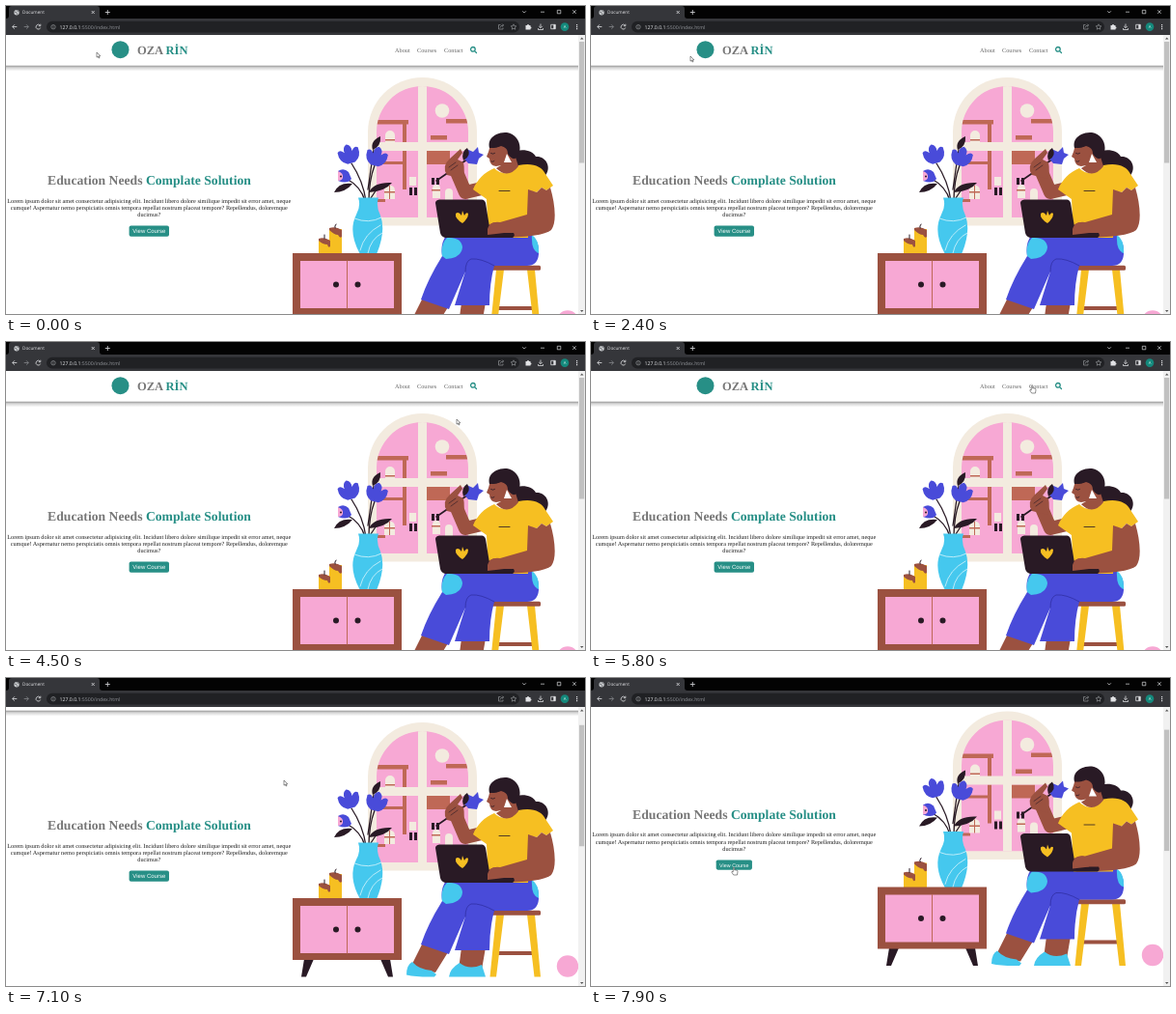
Animation of 600x319 px, one loop 8000 ms. Source, as an HTML page:

```html
<!DOCTYPE html>
<html lang="en">
<head>
<meta charset="utf-8">
<title>Document</title>
<style>
  html, body { margin: 0; width: 100%; height: 100%; overflow: hidden; background: #fff; }
  svg { display: block; width: 100%; height: 100%; }
  text { text-rendering: geometricPrecision; }
  .serif { font-family: "Liberation Serif", serif; font-size: 6.25px; }
  .ui { font-family: "Open Sans", sans-serif; font-size: 4.7px; }
  .mid { text-anchor: middle; }
  .bold { font-weight: bold; }
  .teal { fill: #278f86; }
  .grey { fill: #777; }
  .pink { fill: #f7a8d4; }
  .cream { fill: #f3ebdf; }
  .brick { fill: #bf6856; }
  .brown { fill: #9b5140; }
  .dark { fill: #291a25; }
  .blue { fill: #494bd9; }
  .cyan { fill: #45c8ee; }
  .gold { fill: #f6bf22; }
  .line { fill: none; stroke-linecap: round; stroke-linejoin: round; }
  .icon { fill: none; stroke: #dcdde0; stroke-width: .8; }
  .dim { stroke: #a3a6aa; stroke-width: .6; }
</style>
</head>
<body>
<svg viewBox="0 0 600 319">
  <defs>
    <linearGradient id="shade" x2="0" y2="1">
      <stop stop-color="#000" stop-opacity=".45"/>
      <stop offset=".4" stop-color="#000" stop-opacity=".16"/>
      <stop offset="1" stop-color="#000" stop-opacity="0"/>
    </linearGradient>
    <clipPath id="view"><path d="M0 30H593V319H0Z"/></clipPath>
    <clipPath id="pane"><path d="M384 219V130.5a47.5 47.5 0 0 1 95 0V219Z"/></clipPath>
    <path id="tulip" class="blue" d="M-11-5Q-8-8-4-3Q-5-9 0-11Q5-9 4-3Q8-8 11-5Q12 5 4 9H-4Q-12 5-11-5Z"/>
  </defs>

  <rect width="600" height="319" fill="#fff"/>
  <g clip-path="url(#view)">
    <g id="page">
      <!-- hero text -->
      <text class="serif bold mid grey" x="148.5" y="185.300" style="font-size:13.68px">Education Needs <tspan class="teal">Complate Solution</tspan></text>
      <g class="serif mid" fill="#1c1c1c">
        <text x="148.25" y="203.800">Lorem ipsum dolor sit amet consectetur adipisicing elit. Incidunt libero dolore similique impedit sit error amet, neque</text>
        <text x="148.25" y="211">cumque! Aspernatur nemo perspiciatis omnis tempora repellat nostrum placeat tempore? Repellendus, doloremque</text>
        <text x="148.25" y="218.200">ducimus?</text>
      </g>
      <g id="button">
        <rect class="teal" x="-20.7" y="-5.7" width="41.4" height="11.200" rx="2"/>
        <text class="mid" y="2.1" fill="#fff" font-family="Liberation Sans, sans-serif" font-size="6">View Course</text>
      </g>

      <!-- window -->
      <path class="cream" d="M375 227.500V130.500a56.500 56.500 0 0 1 113 0V227.500Z"/>
      <g clip-path="url(#pane)">
        <rect class="pink" x="384" y="80" width="95" height="140"/>
        <circle class="cream" cx="452" cy="108.500" r="7.300"/>
        <path class="brick" d="M382 118h35v4.500h-35zM411 122h4v20h-4zM456 117h24v4.500h-24zM440 134h17v4.500h-17zM384 161h31v3h-31zM411 150h4v40h-4zM436 150h24v14h-24zM384 200h9v3h-9z"/>
        <path class="cream" d="M393 142v-8a5 5 0 0 1 10 0v8zM392 200v-9a5.500 5.500 0 0 1 11 0v9zM442 199v-10a4 4 0 0 1 8 0v10zM455 202v-9a4 4 0 0 1 8 0v9zM418 177h7v9h-7z"/>
        <path class="brick" d="M393 138h10v1.500h-10zM392 192h11v1.500h-11zM397 186h1v14h-1zM441 190h9v1.500h-9z"/>
        <path class="dark" d="M418 188h3v8h-3zM423 188h3v8h-3zM441 178h3v7h-3zM446 178h3v7h-3z"/>
        <path class="cream" d="M427 80h9v140h-9zM384 141h95v9h-95z"/>
      </g>

      <!-- flowers and vase -->
      <g class="line" stroke="#291a25" stroke-width="1.300">
        <path d="M358 163Q370 181 373 202M382 165Q376 181 376 202M353 179Q368 187 372 202M381 149Q378 170 375 190M386 187L378 199"/>
      </g>
      <path class="dark" d="M380 149Q377 140 388 135Q389 145 380 149ZM340 193Q345 182 359 184Q352 193 340 193ZM376 193Q381 182 400 183Q393 192 376 193Z"/>
      <use href="#tulip" transform="translate(355.500 154) rotate(-16)"/>
      <use href="#tulip" transform="translate(384 156.500) rotate(14)"/>
      <path class="blue" d="M344 171Q350 167 355 172L358 179Q354 185 344 181Z"/>
      <path class="pink" d="M344 171Q350 173 349 178Q348 181 344 181Z"/>
      <circle class="dark" cx="347" cy="176.500" r="1"/>
      <path class="cyan" d="M365 198.500H386Q383 207 388 217Q394 233 384 257H367Q354 234 363 216Q368 207 365 198.500Z"/>
      <path class="line" stroke="#d8f4fc" stroke-width=".8" d="M361 220Q376 226 389 219M388 227Q371 236 367 253M390 235Q378 241 375 256"/>

      <!-- candles and dresser -->
      <path class="gold" d="M335 231h13v26h-13zM324 242h12v15h-12z"/>
      <path class="brown" d="M335 230q7-2 13 2v7q-2 2-4-2q-4 0-9-5zM324 241q6-2 12 2v6q-2 2-3-2q-5 0-9-4z"/>
      <path class="line" stroke="#291a25" d="M341 230q-1-2 1-4M330 241v-4"/>
      <path class="dark" d="M309 319h10l-8 18.500h-5zM388 319h10l3 18.500h-5z"/>
      <path class="brown" d="M297 256h113v64h-113z"/>
      <path class="pink" d="M305 264h97v49h-97z"/>
      <path class="line" stroke="#bf6856" d="M353.500 264v49"/>
      <circle class="dark" cx="342" cy="288.500" r="3"/>
      <circle class="dark" cx="364.500" cy="288.500" r="3"/>

      <!-- stool -->
      <path class="brown" d="M509 311h38v4h-38z"/>
      <path class="gold" d="M508 273h8l-8 64.500h-6.500zM540 273h8l6 64.500h-6.500z"/>
      <rect class="brown" x="502" y="268.800" width="52" height="5" rx="1.500"/>

      <!-- legs and shoes -->
      <path class="brown" d="M432 302L458 312L445 333L419 328ZM472 307H497L493 330H469Z"/>
      <path class="cyan" d="M421 322Q428 330 441 331L446 335L444 337.500Q426 338 415 335.500Q415 325 421 322ZM470 323Q480 331 493 325L497 337.500H459Q460 329 470 323Z"/>
      <path class="blue" d="M456 238Q500 231 540 235Q553 240 552 257Q551 269 540 269H506Q501 287 501 310H465L476 275L459 314L430 304Q437 283 452 259Q450 246 456 238Z"/>
      <path class="line" stroke="#2d2c9c" stroke-width=".7" d="M476 275Q476 264 482 262Q492 261 506 269"/>
      <path class="cyan" d="M457 240Q472 239 473 250Q472 261 456 262L452 259Q450 247 457 240ZM545 237Q553 243 552 256Q544 254 545 237Z"/>

      <!-- torso and head -->
      <path class="dark" d="M524 152C533 147 546 149 549 156C559 155 565 166 560 174C556 180 545 177 543 172C533 173 526 165 524 152Z"/>
      <path class="line" stroke="#9b5140" stroke-width="14" d="M493 189L476 193L467 172"/>
      <path class="gold" d="M506 168Q518 180 531 165C546 162 555 166 559 174L567 186L560 191L555 188L550 193L541 191L541 240H500L498 200L484 190C488 180 496 172 506 168Z"/>
      <path class="line" stroke="#291a25" stroke-width=".8" d="M511 191.500h11"/>
      <path class="brown" d="M503 140L500 151L498 156L501 158Q501 165 508 166L513 165L508 168Q520 180 531 166L526 150L515 138Z"/>
      <path class="dark" d="M501 147C498 136 510 130 519 131C531 133 536 146 530 156C527 160 523 158 520 153C520 148 517 146 513 145C509 147 505 147 501 147Z"/>
      <path class="line" stroke="#291a25" stroke-width=".8" d="M502.500 152.500q2 1.500 4 0M503 161q2 1 3-.5"/>
      <path fill="#fff" d="M519 153l5 9h-8z"/>

      <!-- raised hand with flower -->
      <path class="line" stroke="#291a25" stroke-width="1.600" d="M446 181L482 156"/>
      <path class="blue" d="M477 148L484 151L489 146L490 152L495 154L490 158L488 164L479 163L474 157Z"/>
      <path class="dark" d="M474 160Q471 151 478 147Q483 155 474 160Z"/>
      <path class="brown" d="M457 175Q451 166 460 158L471 148L473 152L468 159L474 162Q476 171 473 179Z"/>
      <path class="line" stroke="#291a25" stroke-width=".6" d="M459 167l7-5M461 170l7-5"/>

      <!-- arm and laptop -->
      <path class="brown" d="M541 190L550 193L555 188L560 191L564 188C569 205 571 224 565 232Q556 240 503 240L495 235Q500 222 512 224L540 216Z"/>
      <path class="dark" d="M449 200.500H493Q496 200.500 497 204L502 235H526Q528 238 525 240H455Q451 239 450 235L445 204Q445 201 449 200.500Z"/>
      <path class="gold" d="M473 225Q465 220 466 215Q469 212 472 217L473 212L475 217Q477 213 479 215Q479 220 473 225Z"/>
      <path class="brown" d="M499 231q2-8 11-7l10 5-4 6-17 2z"/>

      <circle class="pink" cx="582" cy="326.500" r="11.200"/>

      <!-- site header -->
      <rect x="0" y="61.500" width="593" height="6" fill="url(#shade)"/>
      <rect x="0" y="30" width="593" height="31.500" fill="#fff"/>
      <circle class="teal" cx="118.500" cy="45.200" r="9"/>
      <text class="serif bold grey" x="136" y="50" style="font-size:12.5px">OZA <tspan class="teal">RİN</tspan></text>
      <g class="serif" fill="#666">
        <text x="403" y="48">About</text>
        <text x="426" y="48">Courses</text>
        <text x="454" y="48">Contact</text>
      </g>
      <path class="line" stroke="#278f86" stroke-width="1.300" d="M485.600 46.600L487.500 48.500M486.200 44.800a2.300 2.300 0 1 1-4.600 0a2.300 2.300 0 1 1 4.600 0"/>
    </g>
  </g>

  <!-- scrollbar -->
  <rect x="593" y="30" width="7" height="289" fill="#f1f1f1"/>
  <rect id="thumb" x="594" y="37" width="5.200" height="125.500" fill="#c1c1c1"/>
  <path fill="#555" d="M595 34.500h3.500l-1.750-2zM595 315h3.500l-1.750 2z"/>

  <!-- browser frame -->
  <rect width="600" height="14" fill="#030303"/>
  <path fill="#35363a" d="M0 13Q3 13 3 10V3Q3 0 6 0H94Q97 0 97 3V10Q97 13 100 13H600V30H0Z"/>
  <circle cx="11" cy="6.700" r="2.700" fill="#c9cbce"/>
  <path class="line" stroke="#54565b" stroke-width=".7" d="M8.800 6l2 .7 1 2M11 4.500l1.800 1"/>
  <text class="ui" x="17" y="8.300" fill="#e4e5e8">Document</text>
  <g class="icon">
    <path d="M88.700 5l3 3m0-3l-3 3M102.800 6.500h5m-2.500-2.500v5"/>
    <path stroke-width=".7" d="M535.300 5.300l1.800 1.800 1.800-1.800M554 6.200h4M571.300 4.300h3.500v3.500h-3.500zM587.200 4.300l3.600 3.600m0-3.600l-3.600 3.600"/>
    <path d="M11.300 21.500h-4.600m2.200-2.200l-2.200 2.200 2.200 2.200"/>
    <path stroke="#85878b" d="M18.700 21.500h4.600m-2.200-2.200l2.200 2.200-2.200 2.200"/>
    <path d="M35.200 20a2.400 2.400 0 1 0 .5 2.500M35.800 18.700v2h-2"/>
  </g>
  <rect x="42" y="15.800" width="490" height="11.800" rx="5.900" fill="#202124"/>
  <g class="icon">
    <g class="dim">
      <circle cx="49" cy="21.700" r="2.200"/>
      <path d="M49 21.300v1.600M49 20v.6"/>
      <path d="M512.500 19.500h-2v4.500h4.500v-1.500M512 22.500q.5-2.500 3.500-2.500m-1.300-1.400l1.400 1.400-1.400 1.400"/>
      <path d="M526 18.800l.8 1.900 2 .2-1.500 1.300.5 2-1.800-1-1.800 1 .5-2-1.500-1.300 2-.2z"/>
    </g>
    <path d="M554 18.500v4m-1.800-1.600l1.800 1.800 1.800-1.800M551.500 23v1.500h5v-1.500"/>
    <path d="M564.700 19.300h4.600v4.400h-4.600zM568 19.300v4.400"/>
  </g>
  <path fill="#e1e2e5" d="M538.500 20h1.500a1 1 0 0 1 2 0h1.500v1.500a1 1 0 0 1 0 2v1h-5zM567.500 19.300h1.800v4.400h-1.800z"/>
  <text class="ui" x="55.500" y="23.600" fill="#e8eaed" style="font-size:5.2px">127.0.0.1<tspan fill="#92959a">:5500/index.html</tspan></text>
  <circle cx="579" cy="21.600" r="4.300" fill="#14897c"/>
  <text class="ui mid" x="579" y="23.200" fill="#dff3ef" style="font-size:4.3px">A</text>
  <path fill="#dcdde0" d="M591 19h1.200v1.200h-1.200zM591 21h1.200v1.200h-1.200zM591 23h1.200v1.200h-1.200z"/>

  <g stroke="#222" stroke-width=".5" stroke-linejoin="round" fill="#fff">
    <path id="arrow" d="M0 0V5.200L1.300 4.100L2.100 6L3 5.600L2.200 3.900H3.800Z"/>
    <path id="hand" d="M-.7.500Q0-.4.700.5V3Q1.400 2.500 1.900 3.200Q2.600 2.800 3 3.500Q4 3.200 4 4.500L3.500 8H-.3L-2.300 5Q-2.300 3.800-.7 4.800Z"/>
  </g>
</svg>
<script>
const LOOP = 8000;
const POINTER = 0, LINK = 1;
const cursorStops = [
  [0, 94, 48, POINTER], [2400, 103, 52, POINTER], [2500, 118, 88, POINTER],
  [2900, 219, 197, POINTER], [3100, 300, 172, POINTER], [3200, 372, 130, POINTER],
  [3500, 430, 98, POINTER], [4000, 455, 86, POINTER], [4500, 467, 80, POINTER],
  [5000, 440, 66, POINTER], [5100, 412, 52, POINTER], [5300, 410, 45, LINK],
  [5400, 422, 46, POINTER], [5500, 435, 45, LINK], [5700, 449, 46, POINTER],
  [5800, 457, 45, LINK], [6000, 464, 45, LINK], [6300, 474, 46, POINTER],
  [6400, 480, 45, POINTER], [6500, 485, 45, LINK], [6900, 489, 45, LINK],
  [7000, 402, 72, POINTER], [7100, 288, 106, POINTER], [7200, 240, 140, POINTER],
  [7500, 205, 165, POINTER], [7600, 175, 182, POINTER], [7700, 158, 191, LINK],
  [7800, 151, 195, LINK], [7900, 148, 196, LINK]
];
const scrollStops = [[0, 0], [7000, 9], [7100, 28], [7200, 39.5]];
const scaleStops = [[0, 1], [7700, .98], [7800, .93], [7900, .9]];

const $ = id => document.getElementById(id);
const place = (id, transform) => $(id).setAttribute("transform", transform);
const held = (stops, time) => stops.findLast(stop => stop[0] <= time);

function draw() {
  const time = performance.now() % LOOP;
  const [, x, y, shape] = held(cursorStops, time);
  const scroll = held(scrollStops, time)[1];

  place("page", `translate(0 ${-scroll})`);
  place("thumb", `translate(0 ${scroll * .42})`);
  place("button", `translate(148.3 233.2) scale(${held(scaleStops, time)[1]})`);
  for (const id of ["arrow", "hand"]) place(id, `translate(${x} ${y})`);
  $("arrow").style.display = shape === POINTER ? "" : "none";
  $("hand").style.display = shape === LINK ? "" : "none";
  requestAnimationFrame(draw);
}
draw();
</script>
</body>
</html>
```
